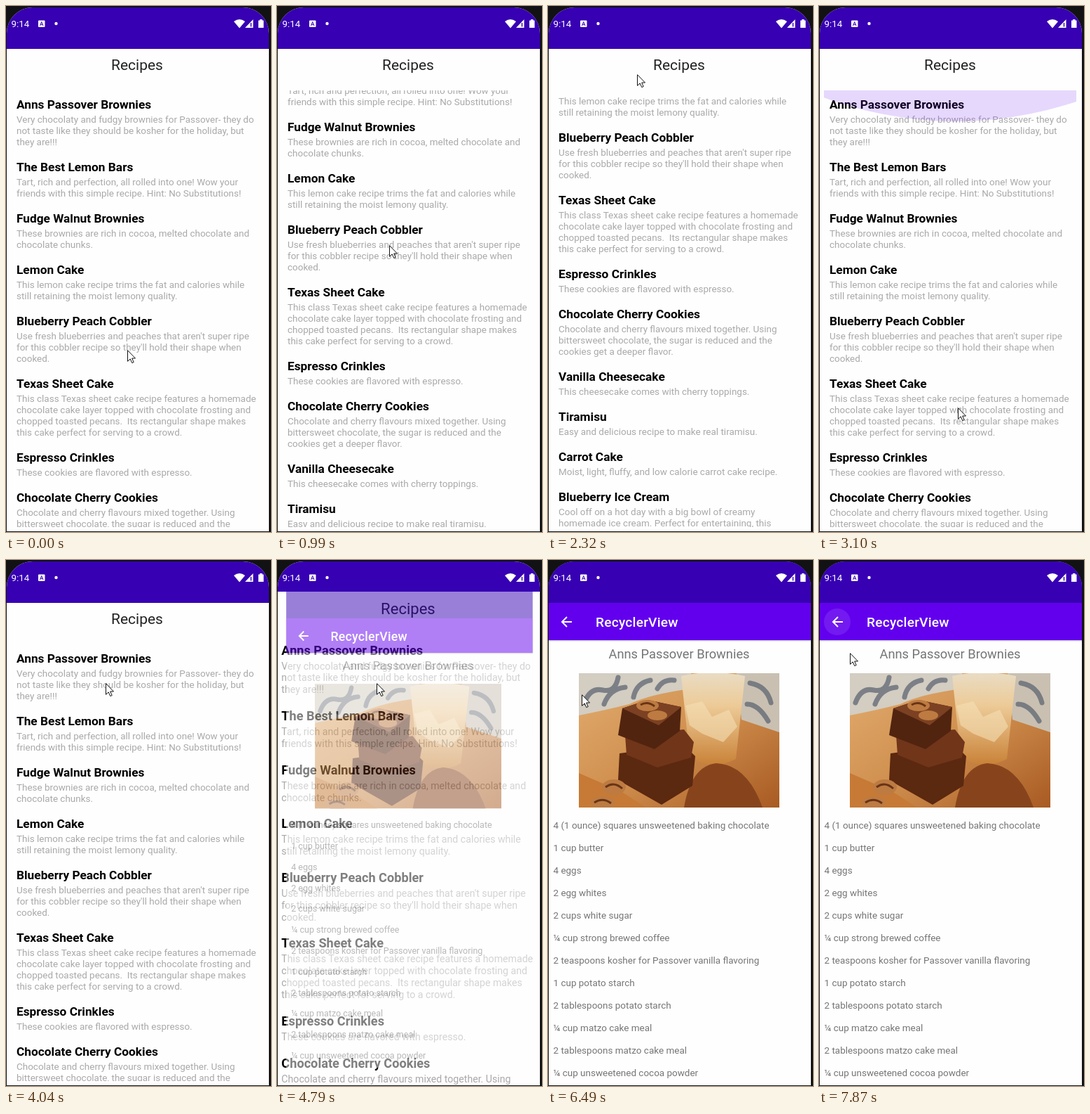
These frames come from a looping animation (378x748 px, 7990 ms). An HTML page:

```html
<!DOCTYPE html>
<html lang="en">
<head>
<meta charset="utf-8">
<title>Recipe list</title>
<style>
html, body { margin: 0; width: 100%; height: 100%; overflow: hidden; background: #121214; }
body { position: relative; font: 13.48px/16px Roboto, sans-serif; }
body *, .fill { position: absolute; }
svg * { position: static; }
.fill { left: 0; top: 0; width: 378px; height: 748px; }
#screen { clip-path: inset(2px 3px 1px 1px round 37px 37px 0 0); background: #fefefe; }
.page { background: linear-gradient(#3700b3 61px, #fefefe 61px); transform-origin: 188px 374px; }
.line { white-space: pre; line-height: 20px; margin-top: -10px; }
.mid { left: 0; width: 374px; text-align: center; }
#view { left: 0; top: 120px; width: 375px; height: 621px; overflow: hidden; }
#list { left: 15px; top: -120px; color: #a9a9a9; }
#list b { font-size: 17.3px; color: #000; }
#detail { color: #757575; }
#bar { left: 0; top: 61px; width: 378px; height: 53px; background: #6200ee; box-shadow: 0 1px 2px #0004; }
#ripple { left: 7px; top: 69px; width: 38px; height: 38px; border-radius: 50%; background: #fff; }
</style>
</head>
<body>
<div id="screen" class="fill">
  <div id="home" class="page fill">
    <div class="line mid" style="top:84px;font-size:21px;color:#222">Recipes</div>
    <div id="view"><div id="list"></div></div>
    <svg style="left:7px;top:120px" width="360" height="621"><circle id="glow" r="540" fill="#6200ee" fill-opacity=".15"/></svg>
  </div>
  <div id="detail" class="page fill">
    <div id="bar"></div>
    <div id="ripple"></div>
    <svg class="fill"><path d="M34 88H20.500M27 81L20 88L27 95" fill="none" stroke="#fff" stroke-width="2"/></svg>
    <div class="line" style="left:68px;top:89px;font-size:19.1px;font-weight:500;letter-spacing:.24px;color:#fff">RecyclerView</div>
    <div class="line mid" style="top:134px;font-size:18.3px">Anns Passover Brownies</div>
    <svg style="left:44px;top:161px" width="286" height="191">
      <defs>
        <linearGradient id="wood" x2="1" y2="1"><stop stop-color="#e2ad70"/><stop offset=".5" stop-color="#d0904f"/><stop offset="1" stop-color="#a85a22"/></linearGradient>
        <linearGradient id="milk" x2="0" y2="1"><stop stop-color="#e9dcc4"/><stop offset=".35" stop-color="#edcb98"/><stop offset="1" stop-color="#c98238"/></linearGradient>
      </defs>
      <rect width="286" height="191" fill="url(#wood)"/>
      <path d="M0 0H160V22Q100 30 72 44Q40 52 0 60Z" fill="#d3cdc2"/>
      <path d="M225 0H286V84L232 66Z" fill="#c9c0b2"/>
      <path d="M8 42q8-22 26-18t22-18M36 44q8-22 30-24M78 34q4-20 24-24M112 22q8-14 24-12M244 14q24 4 30 28M240 44q16 0 30 24" fill="none" stroke="#58606d" stroke-width="7" stroke-linecap="round" opacity=".7"/>
      <path d="M0 142L60 168L96 191H0Z" fill="#c67a35"/>
      <path d="M146 4Q190-6 237 4L224 122Q188 140 158 118Z" fill="url(#milk)"/>
      <path d="M152 46L176 40L190 62L214 52L226 76L206 98L176 86L158 74Z" fill="#f6dfb6" opacity=".6"/>
      <path d="M150 191Q160 132 196 128Q240 130 262 191Z" fill="#87441c"/>
      <path d="M58 114L150 102L166 118L162 160L118 187L56 152Z" fill="#5b2810"/>
      <path d="M66 88L150 80L164 98L160 120L112 134L68 116Z" fill="#713519"/>
      <path d="M62 50L98 38L146 48L144 82L108 108L56 88Z" fill="#512410"/>
      <path d="M62 50L98 38L146 48L114 74Z" fill="#7c4122"/>
      <g fill="#bd7b42">
        <ellipse cx="98" cy="46" rx="16" ry="8"/><ellipse cx="112" cy="60" rx="14" ry="7"/>
        <ellipse cx="50" cy="162" rx="17" ry="11"/><ellipse cx="34" cy="184" rx="17" ry="9"/>
      </g>
      <path d="M38 162q12-9 24 2M22 184q12-8 24 1M88 45q10-6 20 2" fill="none" stroke="#693416" stroke-width="3"/>
    </svg>
  </div>
  <div class="line" style="left:7.500px;top:26px;font-size:13.4px;color:#fff">9:14</div>
  <svg class="fill" fill="#fff">
    <rect x="46" y="20.500" width="9.500" height="9.500" rx="1"/>
    <path d="M48.500 28L50.700 22.500L53 28M49.300 26.300H52.200" fill="none" stroke="#3700b3"/>
    <circle cx="71.500" cy="25" r="2.200"/>
    <path d="M325 22Q333 16 341 22L333 31.500ZM341 31L352.500 19V31ZM360 20.500H362V19H365.500V20.500H367.500V31H360Z"/>
    <path d="M349.500 24V29.500" stroke="#3700b3" stroke-width="1.500"/>
  </svg>
</div>
<svg id="cursor" width="14" height="21"><path d="M.5 .7V16.300L4.200 12.900L6.800 18.600L9.200 17.500L6.700 12H11.500Z" fill="#fff" stroke="#111"/></svg>
<script>
const $ = id => document.getElementById(id);

const recipes = [
  'Anns Passover Brownies|Very chocolaty and fudgy brownies for Passover- they do|not taste like they should be kosher for the holiday, but|they are!!!',
  'The Best Lemon Bars|Tart, rich and perfection, all rolled into one! Wow your|friends with this simple recipe. Hint: No Substitutions!',
  'Fudge Walnut Brownies|These brownies are rich in cocoa, melted chocolate and|chocolate chunks.',
  'Lemon Cake|This lemon cake recipe trims the fat and calories while|still retaining the moist lemony quality.',
  "Blueberry Peach Cobbler|Use fresh blueberries and peaches that aren't super ripe|for this cobbler recipe so they'll hold their shape when|cooked.",
  'Texas Sheet Cake|This class Texas sheet cake recipe features a homemade|chocolate cake layer topped with chocolate frosting and|chopped toasted pecans.  Its rectangular shape makes|this cake perfect for serving to a crowd.',
  'Espresso Crinkles|These cookies are flavored with espresso.',
  'Chocolate Cherry Cookies|Chocolate and cherry flavours mixed together. Using|bittersweet chocolate, the sugar is reduced and the|cookies get a deeper flavor.',
  'Vanilla Cheesecake|This cheesecake comes with cherry toppings.',
  'Tiramisu|Easy and delicious recipe to make real tiramisu.',
  'Carrot Cake|Moist, light, fluffy, and low calorie carrot cake recipe.',
  'Blueberry Ice Cream|Cool off on a hot day with a big bowl of creamy|homemade ice cream. Perfect for entertaining, this|five-star recipe makes enough for a crowd.'
];
const ingredients = [
  '4 (1 ounce) squares unsweetened baking chocolate', '1 cup butter', '4 eggs', '2 egg whites',
  '2 cups white sugar', '¼ cup strong brewed coffee', '2 teaspoons kosher for Passover vanilla flavoring',
  '1 cup potato starch', '2 tablespoons potato starch', '¼ cup matzo cake meal',
  '2 tablespoons matzo cake meal', '¼ cup unsweetened cocoa powder'
];

function addLine(parent, text, x, y, tag = 'div') {
  const el = document.createElement(tag);
  el.className = 'line';
  el.textContent = text;
  el.style.left = x + 'px';
  el.style.top = y + 'px';
  parent.append(el);
}

let y = 140;
for (const recipe of recipes) {
  const [title, ...lines] = recipe.split('|');
  addLine($('list'), title, 0, y, 'b');
  lines.forEach((line, i) => addLine($('list'), line, 0, y + 21 + 16 * i));
  y += 41 + 16 * lines.length;
}
ingredients.forEach((text, i) => addLine($('detail'), text, 7.5, 377 + 32 * i));

// Held poses: time, cursor x, cursor y, list scroll, overscroll glow (+ bottom, - top)
const poses = [
  [0, 173, 489], [990, 160, 340, 130], [1110, 140, 150, 287, 18], [1230, 128, 7, 287, 46],
  [1390, 127, 6, 287, 36], [1530, 127, 32, 276], [1650, 127, 64, 261], [2040, 127, 76, 261],
  [2170, 127, 87, 261], [2320, 127, 97, 261], [2590, 127, 112, 261], [2715, 127, 145, 261],
  [2840, 127, 174, 261], [2980, 155, 330, 120], [3100, 198, 571, 0, -44], [3250, 198, 571, 0, -44.5],
  [3370, 198, 571, 0, -45], [3520, 194, 540, 0, -22], [3640, 185, 479], [3790, 172, 390],
  [3915, 153, 260], [4040, 142, 175], [5510, 149, 340], [5640, 157, 510], [5790, 157, 534],
  [6370, 100, 350], [6490, 48, 191], [6640, 29, 122], [6790, 22, 94], [7750, 32, 112], [7870, 44, 132]
];
const loop = 7990, opened = 4790, settled = 5080, pressed = 7600;

function draw(t) {
  const [, x, y, scroll = 0, glow = 0] = poses.findLast(p => p[0] <= t);
  $('cursor').style.transform = `translate(${x}px, ${y}px)`;
  $('list').style.transform = `translateY(${-scroll}px)`;
  $('glow').style.visibility = glow ? 'inherit' : 'hidden';
  $('glow').setAttribute('cx', glow > 0 ? 149 : 188);
  $('glow').setAttribute('cy', glow > 0 ? 1161 - glow : -540 - glow);

  const step = t < opened ? 0 : t < 4940 ? 1 : t < settled ? 2 : 3;
  $('home').style.transform = `scale(${[1, 1.05, 1.1, 1][step]})`;
  $('detail').style.opacity = [0, .5, 1, 1][step];
  $('detail').style.transform = `scale(${[1, .93, .985, 1][step]})`;
  $('ripple').style.opacity = t < pressed ? 0 : .1;
}

const start = performance.now();
function tick() {
  draw((performance.now() - start) % loop);
  requestAnimationFrame(tick);
}
tick();
</script>
</body>
</html>
```
